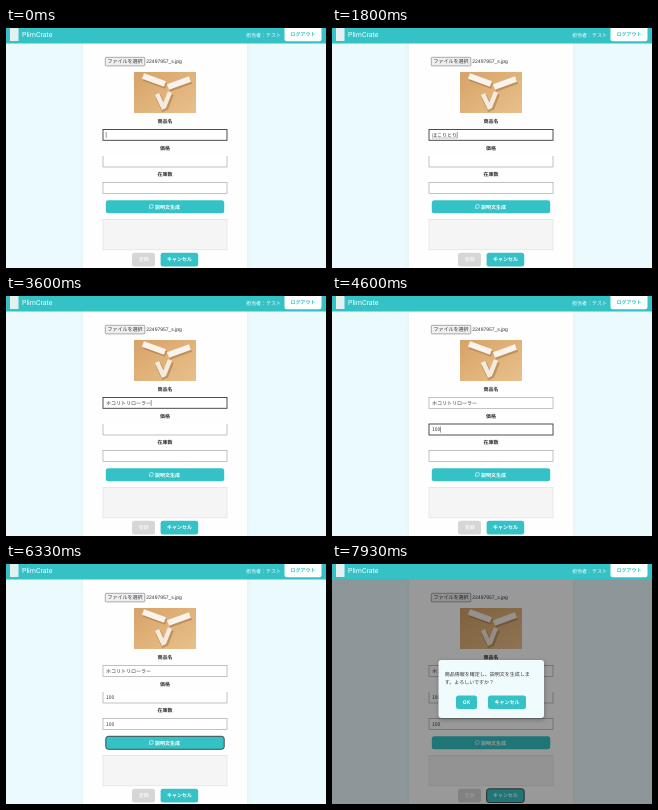
An HTML page that plays this animation: 320x240 px, repeating every 8000 ms.

```html
<!DOCTYPE html>
<html lang="ja">
<head>
<meta charset="utf-8">
<title>商品登録</title>
<style>
  html, body { margin: 0; width: 100%; height: 100%; overflow: hidden; background: #ebfafc; }
  svg { display: block; width: 100vw; height: 100vh; }
  text { font: 5px "Noto Sans CJK JP", "Noto Sans CJK", "Noto Sans", sans-serif; fill: #333; text-rendering: geometricPrecision; }
  .mid { text-anchor: middle; }
  .bold { font-weight: 700; }
  .white { fill: #fff; }
  .teal { fill: #35c2c6; }
  .field { fill: #fff; stroke: #999; stroke-width: .6; }
  .open-top { stroke-dasharray: 0 124 146; }
  .focus { stroke: #3a3a3a; stroke-width: .9; stroke-dasharray: none; }
  .entry { white-space: pre; }
</style>
</head>
<body>
<svg viewBox="0 0 320 240" preserveAspectRatio="none">
  <defs>
    <linearGradient id="wood" x2="1" y2="1">
      <stop stop-color="#d6a269"/><stop offset=".5" stop-color="#e0b279"/><stop offset="1" stop-color="#e8c08c"/>
    </linearGradient>
    <filter id="soft" x="-20%" y="-20%" width="140%" height="140%"><feGaussianBlur stdDeviation="2"/></filter>
    <clipPath id="frame"><rect x="128" y="44" width="62" height="41"/></clipPath>
  </defs>

  <rect width="320" height="240" fill="#ebfafc"/>
  <rect x="77" y="10" width="164" height="240" fill="#d5eaed" opacity=".6" filter="url(#soft)"/>
  <rect x="77" y="10" width="164" height="240" fill="#fefefe"/>

  <rect x="99.3" y="29.3" width="39.5" height="8.6" rx="1" fill="#efefef" stroke="#777" stroke-width=".6"/>
  <text class="mid" x="119" y="35.4">ファイルを選択</text>
  <text x="140.3" y="35.4" style="font-family:'Liberation Sans',sans-serif">22497957_s.jpg</text>

  <g clip-path="url(#frame)">
    <rect x="128" y="44" width="62" height="41" fill="url(#wood)"/>
    <g fill="none" stroke-width="6">
      <path d="M137 48 159 56M162 59 184 51M151 66 158 81M164 64 158 79" stroke="#8d5c30" opacity=".4" transform="translate(1 2)"/>
      <path d="M137 48 159 56M162 59 184 51" stroke="#f8f3ec"/>
      <path d="M151 66 158 81M164 64 158 79" stroke="#f4ebdf" stroke-width="4.500"/>
    </g>
  </g>

  <text class="mid bold" x="159" y="95">商品名</text>
  <text class="mid bold" x="159" y="121.700">価格</text>
  <text class="mid bold" x="159" y="148">在庫数</text>

  <rect id="name" class="field" x="97" y="101.500" width="124" height="10.800"/>
  <rect id="price" class="field open-top" x="97" y="128" width="124" height="11"/>
  <rect id="stock" class="field" x="97" y="154.300" width="124" height="11"/>
  <text id="nameText" class="entry" x="100" y="108.900"></text>
  <text id="priceText" class="entry" x="100" y="135.400"></text>
  <text id="stockText" class="entry" x="100" y="161.700"></text>
  <path id="underline" stroke="#555" stroke-width=".5" stroke-dasharray="1 .4"/>
  <path id="caret" stroke="#333" stroke-width=".5"/>

  <rect id="generate" class="teal" x="99.800" y="172.300" width="118.400" height="13" rx="2.500"/>
  <path d="M143.400 180.400 143.700 179.100A1.900 1.900 0 1 1 144.700 180.100Z" fill="none" stroke="#fff" stroke-width=".6"/>
  <text class="bold white" x="149" y="180.700">説明文生成</text>
  <rect id="memo" x="97" y="191.500" width="124" height="30.300" fill="#f5f5f5" stroke="#dcdcdc" stroke-width=".6"/>
  <rect x="126" y="224.800" width="23" height="13.700" rx="2.500" fill="#d6d6d6"/>
  <text class="mid bold" x="137.700" y="233.300" style="fill:#f4f4f4">登録</text>
  <rect id="cancel" class="teal" x="154.600" y="224.800" width="37.600" height="13.700" rx="2.500"/>
  <text class="mid bold white" x="173.500" y="233.300">キャンセル</text>

  <g id="dialog" visibility="hidden">
    <rect width="320" height="240" opacity=".4"/>
    <rect x="106.500" y="97" width="106" height="59" rx="3" opacity=".25" filter="url(#soft)"/>
    <rect x="106.500" y="96" width="105.500" height="58" rx="3" fill="#f0fbfd"/>
    <text x="112.700" y="112">商品情報を確定し、説明文を生成しま</text>
    <text x="112.700" y="120">す。よろしいですか？</text>
    <rect class="teal" x="124" y="131.500" width="21" height="13.500" rx="2.500"/>
    <text class="mid bold white" x="134.500" y="140.100">OK</text>
    <rect class="teal" x="156" y="131.500" width="38" height="13.500" rx="2.500"/>
    <text class="mid bold white" x="175" y="140.100">キャンセル</text>
  </g>

  <rect class="teal" width="320" height="15.500"/>
  <rect x="4" y="0" width="8.500" height="13" fill="#e3f1f0"/>
  <text class="white" x="16" y="9.400" style="font-size:7px;font-family:Roboto,sans-serif">PlimCrate</text>
  <text class="white" x="240" y="8.500">担当者：テスト</text>
  <rect x="278.500" y="-2" width="37" height="15.300" rx="2.500" fill="#fff"/>
  <text class="mid bold teal" x="297" y="8.400">ログアウト</text>
</svg>
<script>
  const LOOP = 8000;
  const el = id => document.getElementById(id);

  // Each keystroke leaves either a pending consonant or a finished kana.
  const composed = [];
  let done = '';
  for (const token of 'ｈほ ｋこ ｒり ｔと ｒり ｒろ ー ｒら ー'.split(' ')) {
    for (const char of token) composed.push(done + char);
    done += token.at(-1);
  }
  const CONVERT = 2900, COMMIT = 3270, ASK = 6395;
  const digits = start => ['1', '10', '100'].map((text, i) => [start + i * 130, text]);

  const tracks = {
    name: [[0, ''], ...composed.map((text, i) => [590 + i * 127, text]),
           [CONVERT, 'ホコリトリローラー'], [COMMIT, 'ホコリトリローラー']],
    price: [[0, ''], ...digits(4270)],
    stock: [[0, ''], ...digits(5400)]
  };
  const focusTrack = [[0, 'name'], [3870, 'price'], [5070, 'stock'],
                      [6130, 'generate'], [7600, 'memo'], [7870, 'cancel']];
  const lineY = { name: 107, price: 133.5, stock: 159.8 };
  const at = (track, t) => track.findLast(step => step[0] <= t);

  function setFocus(id) {
    for (const [, other] of focusTrack) el(other).classList.toggle('focus', other === id);
  }

  function draw(t) {
    for (const id in tracks) {
      const text = at(tracks[id], t)[1];
      if (el(id + 'Text').textContent !== text) el(id + 'Text').textContent = text;
    }
    const [focusTime, focus] = at(focusTrack, t);
    setFocus(focus);

    let caret = '', underline = '';
    if (tracks[focus]) {
      const lastKey = Math.max(focusTime, at(tracks[focus], t)[0]);
      const text = el(focus + 'Text');
      const end = 100.2 + (text.textContent ? text.getComputedTextLength() : 0);
      const y = lineY[focus];
      if ((t - lastKey) % 1000 < 500) caret = `M${end} ${y - 3}v6`;
      if (focus === 'name' && text.textContent && t < COMMIT) underline = `M100 ${y + 3}H${end}`;
    }
    el('caret').setAttribute('d', caret);
    el('underline').setAttribute('d', underline);
    el('dialog').setAttribute('visibility', t >= ASK ? 'visible' : 'hidden');
  }

  const start = performance.now();
  function tick() {
    draw((performance.now() - start) % LOOP);
    requestAnimationFrame(tick);
  }
  tick();
</script>
</body>
</html>
```
